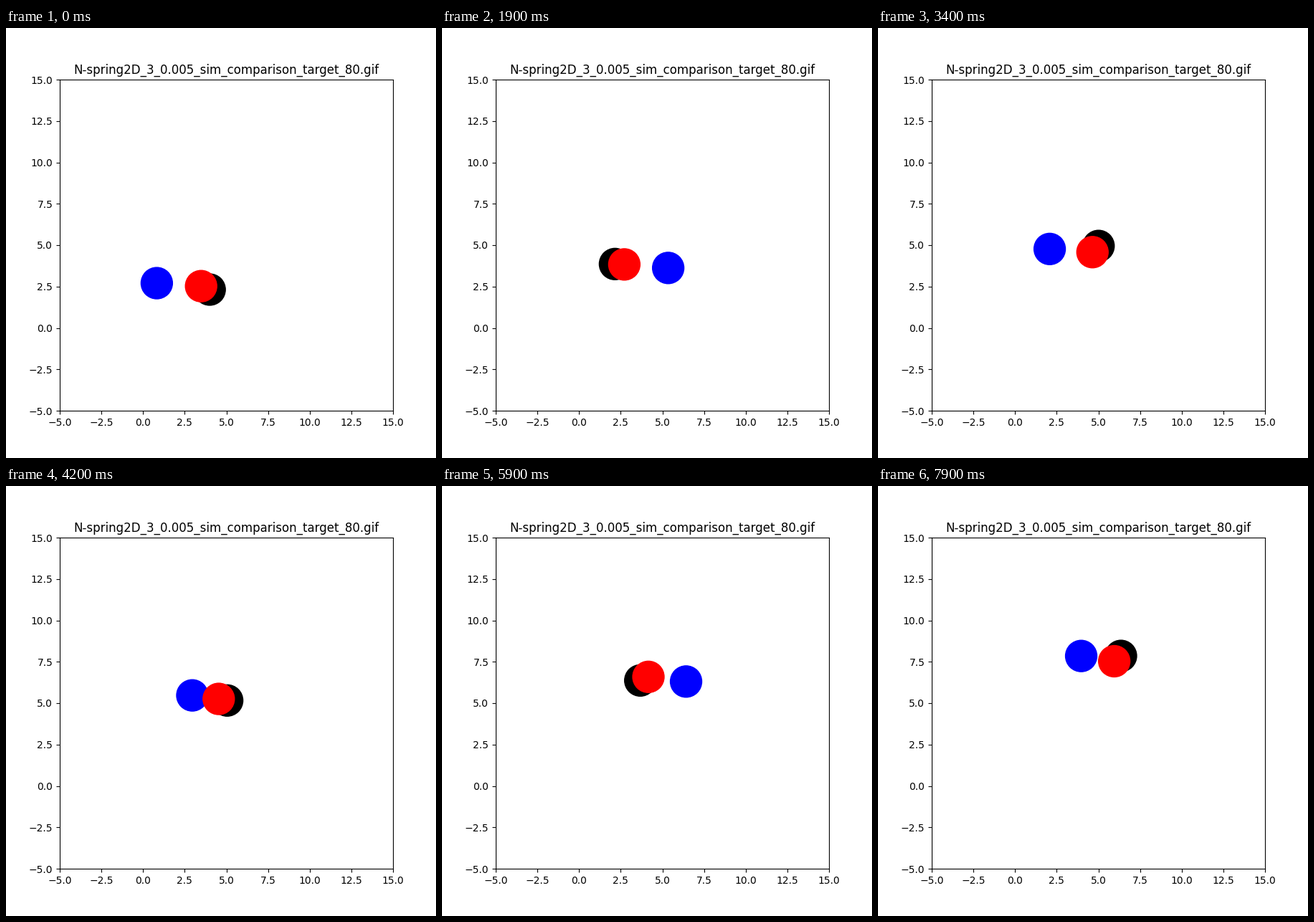
These frames come from a looping animation (600x600 px, 8 s). A matplotlib script:

```python
import numpy as np
import matplotlib.pyplot as plt
from matplotlib.animation import FuncAnimation

FRAMES = 80
INTERVAL = 100
TITLE = "N-spring2D_3_0.005_sim_comparison_target_80.gif"


def positions(n):
    """Centres of the blue, black and red bodies at step n."""
    # The centre of mass drifts at constant speed.
    com = np.array([2.768 + 0.03364 * n, 2.515 + 0.0662 * n])

    # Blue swings against the pair on a thin, slowly turning ellipse.
    a = np.radians(193.7 + 9.489 * n)
    x = 2.002 * np.cos(a)
    tilt = 0.0765 - 0.00109 * n
    arm = np.array([x, -tilt * x - 0.172 * np.sin(a)])

    # Red and black circle around their common middle.
    b = np.radians(8.22 * n)
    c, s = np.cos(b), np.sin(b)
    half = np.array([-0.2007 * c + 0.0973 * s + 0.0294 * x,
                     0.1041 * c + 0.2066 * s])

    pair = com - arm / 2
    return np.array([com + arm, pair - half, pair + half])


fig, ax = plt.subplots(figsize=(6, 6), dpi=100)
ax.set(xlim=(-5, 15), ylim=(-5, 15), title=TITLE)
start = positions(0)
bodies = ax.scatter(start[:, 0], start[:, 1], s=1000,
                    c=["blue", "black", "red"])


def update(n):
    bodies.set_offsets(positions(n))
    return (bodies,)


anim = FuncAnimation(fig, update, frames=FRAMES, interval=INTERVAL,
                     repeat=True, repeat_delay=0)
plt.show()
```
